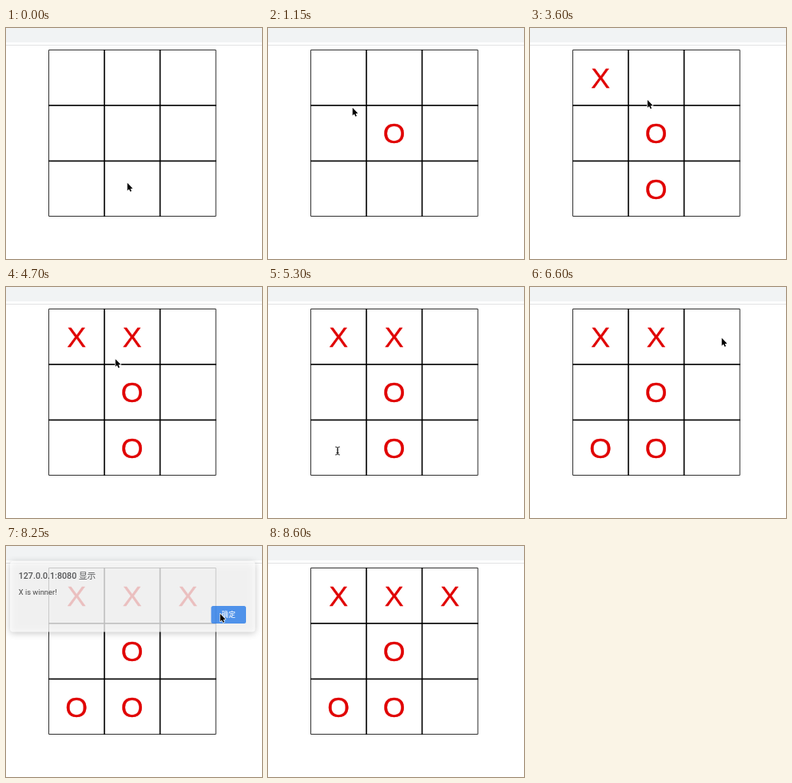
An HTML page with a canvas for the animation above (8990 ms loop, 320 px wide and 289 px high).

```html
<!DOCTYPE html>
<html lang="en">
<head>
<meta charset="utf-8">
<title>Tic-tac-toe</title>
<style>
  html, body { margin: 0; width: 320px; height: 289px; overflow: hidden; background: #fff; }
  canvas { display: block; }
</style>
</head>
<body>
<canvas id="stage" width="320" height="289"></canvas>
<script>
const ctx = document.getElementById('stage').getContext('2d');
const LOOP = 8990, TICK = 50;
const LEFT = 53, TOP = 27, CELL = 69.6;
const ALERT = 6950, CLOSE = 8250;
const UI = 'Roboto, "Noto Sans CJK SC", "Noto Sans CJK", sans-serif';

// O and X take turns: cell, time
const turns = [[4, 500], [0, 1850], [7, 3000], [1, 4250], [6, 5800], [2, CLOSE]];

// pointer moves: start, end, x, y
const home = [151, 193];
const moves = [
  [0, 150, 150, 172], [250, 450, 155, 135], [700, 900, 121, 115],
  [1050, 1150, 105, 99], [1150, 1450, 87, 60], [1850, 2200, 146, 126],
  [2550, 2950, 147, 198], [3150, 4000, 146, 66], [4650, 5300, 87, 205],
  [5800, 6600, 239, 63], [7100, 7500, 241, 97], [7500, 7900, 267, 84]
];

const easeOut = k => 1 - (1 - k) ** 2.3;

const centre = cell => [
  LEFT + CELL * (cell % 3 + 0.5),
  TOP + CELL * (Math.floor(cell / 3) + 0.5)
];

function pointerAt(t) {
  let [x, y] = home;
  for (const [start, end, toX, toY] of moves) {
    if (t <= start) break;
    const k = easeOut(Math.min(1, (t - start) / (end - start)));
    x += (toX - x) * k;
    y += (toY - y) * k;
  }
  return [x, y];
}

function rect(color, x, y, w, h) {
  ctx.fillStyle = color;
  ctx.fillRect(x, y, w, h);
}

function box(color, x, y, w, h, r) {
  ctx.fillStyle = color;
  ctx.beginPath();
  ctx.roundRect(x, y, w, h, r);
  ctx.fill();
}

function label(str, x, y, font, color, align = 'left') {
  ctx.font = font;
  ctx.fillStyle = color;
  ctx.textAlign = align;
  ctx.fillText(str, x, y);
}

function drawPage() {
  rect('#fff', 0, 0, 320, 289);
  rect('#f1f3f4', 0, 0, 320, 18);
  rect('#e2e3e4', 0, 21, 320, 1);
  ctx.strokeStyle = '#333';
  ctx.lineWidth = 1;
  ctx.strokeRect(LEFT + 0.5, TOP + 0.5, CELL * 3, CELL * 3 - 0.8);
  for (const i of [1, 2]) {
    rect('#000', LEFT + i * CELL - 0.4, TOP, 1.6, 209);
    rect('#000', LEFT, TOP + i * CELL - 0.6, 210, 1.6);
  }
}

function drawMarks(t) {
  turns.forEach(([cell, start], i) => {
    if (t < start) return;
    const [x, y] = centre(cell), mark = 'OX'[i % 2];
    label(mark, x + 0.3, y + 12.7,
      '35.7px "Liberation Sans", Arial, sans-serif', '#e00000', 'center');
    ctx.strokeStyle = '#e00000';
    ctx.lineWidth = 0.4;
    ctx.strokeText(mark, x + 0.3, y + 12.7);
  });
}

function dialogAlpha(t) {
  if (t < ALERT) return 0;
  if (t < ALERT + 200) return 0.6;
  return Math.max(0, Math.min(1, (CLOSE + 150 - t) / 200));
}

function drawDialog(alpha) {
  if (!alpha) return;
  ctx.save();
  ctx.globalAlpha = alpha;
  ctx.shadowColor = 'rgba(0,0,0,.3)';
  ctx.shadowBlur = 9;
  ctx.shadowOffsetY = 1.5;
  box('#fff', 5, 19, 306.5, 88.5, 4);
  ctx.shadowColor = 'transparent';
  label('127.0.0.1:8080 显示', 15.7, 41, '500 10.7px ' + UI, '#202124');
  label('X is winner!', 15.7, 61, '9.4px ' + UI, '#111');
  box('#1a73e8', 256.4, 75, 43.6, 22, 2.5);
  label('确定', 278.2, 89.2, 'bold 8.6px ' + UI, '#fff', 'center');
  ctx.restore();
}

function drawArrow(x, y) {
  const outline = [[0, 0], [0, 9.6], [2.1, 7.7], [3.7, 11], [5.2, 10.3], [3.8, 7.1], [6.7, 6.9]];
  ctx.beginPath();
  for (const [dx, dy] of outline) ctx.lineTo(x + 0.7 + dx, y + 0.8 + dy);
  ctx.closePath();
  ctx.lineJoin = 'round';
  ctx.strokeStyle = '#fff';
  ctx.lineWidth = 1.4;
  ctx.stroke();
  ctx.fillStyle = '#000';
  ctx.fill();
}

function drawBeam(x, y) {
  ctx.beginPath();
  for (const side of [-1, 1]) {
    ctx.moveTo(x + side * 2.8, y - 5);
    ctx.quadraticCurveTo(x, y - 5, x, y - 3.4);
    ctx.lineTo(x, y + 3.4);
    ctx.quadraticCurveTo(x, y + 5, x + side * 2.8, y + 5);
  }
  ctx.moveTo(x - 1.5, y + 2.5);
  ctx.lineTo(x + 1.5, y + 2.5);
  ctx.strokeStyle = '#222';
  ctx.lineWidth = 1;
  ctx.stroke();
}

// The pointer becomes a text beam close to the middle of a cell.
function drawPointer(t) {
  if (t >= CLOSE + 100) return;
  const [x, y] = pointerAt(t);
  const overText = turns.some(([cell]) => {
    const [cx, cy] = centre(cell);
    return Math.hypot(x - cx, y - cy) < 8;
  });
  (overText ? drawBeam : drawArrow)(x, y);
}

function frame() {
  const t = Math.floor((performance.now() % LOOP) / TICK) * TICK;
  drawPage();
  drawMarks(t);
  drawDialog(dialogAlpha(t));
  drawPointer(t);
  requestAnimationFrame(frame);
}
frame();
</script>
</body>
</html>
```
